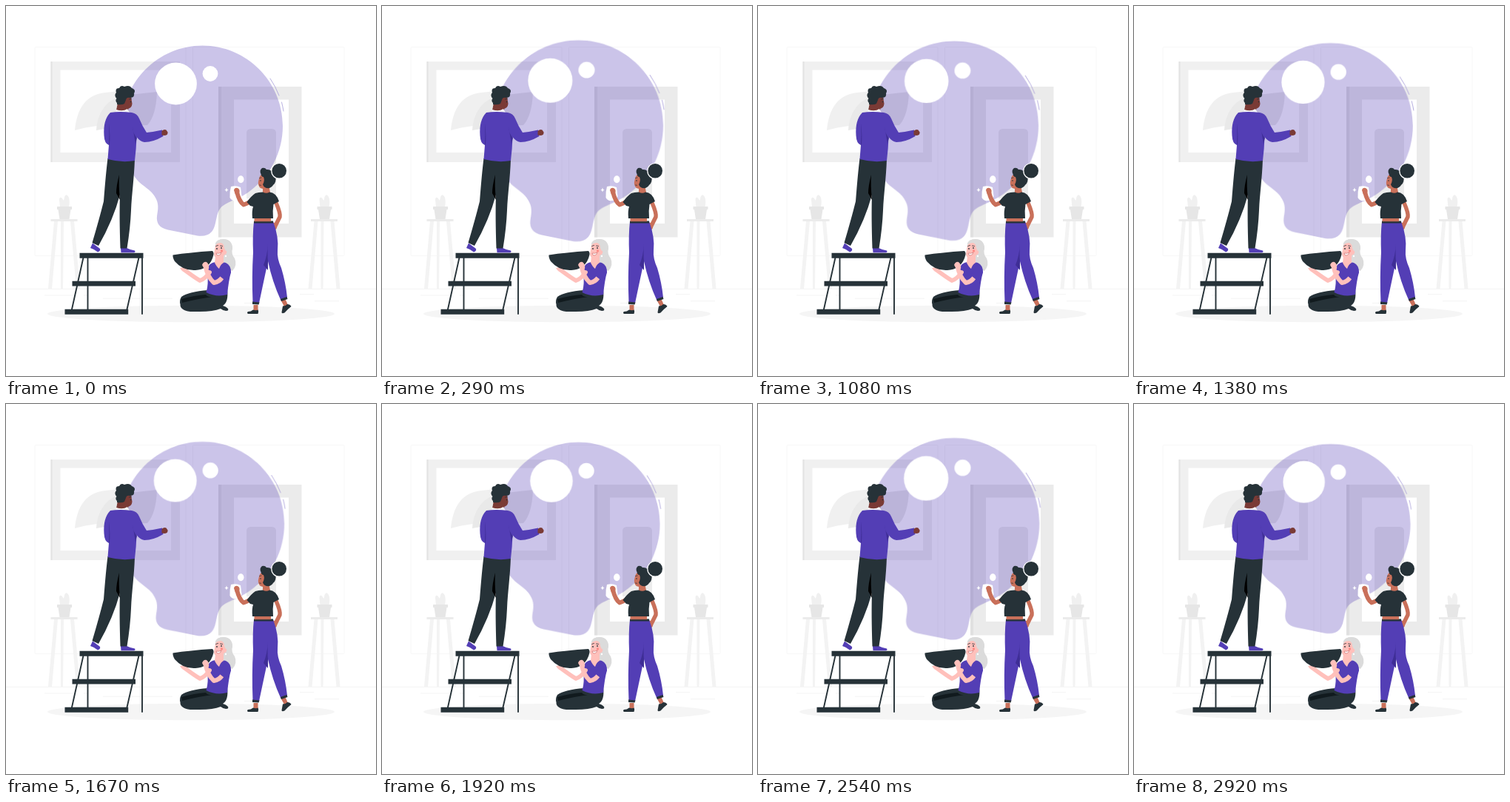
An HTML page for the animation above (2.96 s loop, 500 by 500 pixels).

```html
<!DOCTYPE html>
<html lang="en">
<head>
<meta charset="utf-8">
<title>Bright idea</title>
<style>
  html, body { margin: 0; width: 100%; height: 100%; overflow: hidden; background: #fff; }
  svg { display: block; width: 100vw; height: 100vh; }
  .ink { fill: #263238; }
  .violet { fill: #533eb5; }
  .shade { fill: #3f2e96; }
  .line { fill: none; stroke-linecap: round; stroke-linejoin: round; }
  #bulb {
    transform-origin: 268px 180px;
    animation: pulse 2960ms linear infinite;
  }
  @keyframes pulse {
    0% { transform: scale(1); }
    16.2% { transform: scale(1.094); }
    21.28% { transform: scale(1.088); }
    36.49% { transform: scale(1.048); }
    46.62% { transform: scale(1.027); }
    64.86% { transform: scale(1.014); }
    73.31% { transform: scale(1.056); }
    79.4% { transform: scale(1.096); }
    85.81% { transform: scale(1.06); }
    92.23% { transform: scale(1.031); }
    98.65% { transform: scale(.995); }
    100% { transform: scale(1); }
  }
</style>
</head>
<body>
<svg viewBox="0 0 500 500">
  <defs>
    <g id="stand">
      <path fill="#f3f3f3" d="M65 291h5l-8 91h-5zM74 291h4l-1 91h-3zM87 291h5l8 91h-5z"/>
      <path fill="#ebebeb" d="M60.500 288h36v3h-36z"/>
      <path fill="#f0f0f0" d="M73 272l-1-10q0-4 3-3l3 4 1-5q2-5 5-1 3 5 1 15z"/>
      <path fill="#e6e6e6" d="M69 271h20v4h-1.500l-2 13h-13l-2-13H69z"/>
    </g>
  </defs>

  <!-- room -->
  <g fill="none" stroke="#f4f4f4" stroke-width=".7">
    <rect x="39" y="55.500" width="204" height="282" rx="1"/>
    <rect x="252.500" y="55.500" width="204.500" height="282" rx="1"/>
    <path stroke="#efefef" d="M0 382.400H500M417 398.700h33M322 401.500h9M397 389.500h19M52 391h43M105 391h6M131 395.300h94"/>
  </g>
  <path fill="#f0f0f0" d="M60.500 75H235v136H60.500z"/>
  <path fill="#e3e3e3" d="M60.500 75h2v136h-2z"/>
  <path fill="#fff" d="M73.500 86.500H223v111.500H73.500z"/>
  <path fill="#f0f0f0" d="M93 168C96 138 108 120 134 117Q155 114 170 116L160 160Q120 160 93 168z"/>
  <path fill="#e9e9e9" d="M122 168C124 142 137 125 160 121Q183 118 204 116Q203 148 191 161Q150 162 122 168z"/>
  <path fill="#ebebeb" d="M287 109H399.500V312.500H287z"/>
  <path fill="#e0e0e0" d="M287 109h4v203.500h-4z"/>
  <path fill="#fff" d="M308 126.500h74V294h-74z"/>
  <path fill="#ececec" d="M325 172q0-6 6-6h28q6 0 6 6v88h-40z"/>
  <use href="#stand"/>
  <use href="#stand" x="351.500"/>
  <ellipse cx="250" cy="416" rx="194" ry="11.300" fill="#f5f5f5"/>

  <g id="bulb">
    <path fill="#533eb5" fill-opacity=".3" d="M265.500 53.500C325 53.500 374 102 374 162C374 199 356 230 331 249C319 259 301 264 293 270C282 278 286 296 278 305Q272 312 259 310.500L219 302.500C207 300 203 293 204 284C205 277 207 269 203 261C197 247 183 244 174 231C162 212 157 187 157 162C157 102 206 53.500 265.500 53.500z"/>
    <circle cx="229.500" cy="105" r="28.400" fill="#fff"/>
    <circle cx="276" cy="91.500" r="10.400" fill="#fff"/>
    <path class="line" stroke="#a69cd9" stroke-width=".8" d="M357 98A111.500 111.500 0 0 1 369 121M372.500 130A111.500 111.500 0 0 1 375 142"/>
  </g>

  <!-- step ladder -->
  <path class="line" stroke="#263238" stroke-width="1.900" d="M110.500 340V411M184 340V416M104.500 340L88.500 412M179.500 340L163 412"/>
  <path class="ink" d="M99.500 333.700h86v7h-86zM89.500 371.800H175v6.700H89.500zM79.500 409.800H165.200v7H79.500z"/>

  <!-- painter on the ladder -->
  <path class="violet" d="M117 320.500l10 7.500q1 3-3 4.500-5-4-10-5.500zM155 327h8q6 3 11 3.500 1.500 2-1 2.800h-17.500z"/>
  <path class="ink" d="M137.500 206L174 207C173 235 170 253 169 276Q168 300 163.500 327.500H154.500Q153 284 154 255Q145 289 125 324L116.500 320Q126 288 132 264Q135 225 137.500 206z"/>
  <path fill="#000" d="M153 228q-4 15-4 25l5 9q-2-20-1-34z"/>
  <path fill="#7a3a35" d="M151 131l-2 10q8 5 16 0l1-7z"/>
  <path fill="#7a3a35" d="M154 124C158 118 166 118 169 123L170.500 132Q170 139 163 139Q154 138 154 124z"/>
  <path class="ink" d="M150 131Q147 128 149.500 125Q145.500 121 149 117Q147 111 153 111Q155 106 160 109Q167 106 170 111Q176 113 173 118Q174 124 167 124Q163 123 162 127L160 132Q157 134 150 133z"/>
  <circle cx="168.500" cy="129.500" r=".8" class="ink"/>
  <path class="line" stroke="#263238" stroke-width=".8" d="M166.500 126l3-.8"/>
  <path fill="#f4f4f7" d="M149 140q9 3 15-1l3 5h-19z"/>
  <path class="violet" d="M141 144Q154 142 170 144Q177 145 180 152Q184 162 190 171Q200 170 211 167.500L212.500 176Q199 184 187 184Q181 183 176.500 177Q176 193 174 209Q156 212 137.500 207L139 188Q133 186 132.500 175Q131 154 141 144z"/>
  <path class="shade" d="M139 159q2 15 1 28l-1 1q1-14 0-29zM171 163q1 11 6 15l-2 8q-2-12-4-23z"/>
  <path fill="#7a3a35" d="M210.500 169q3-3 6-1.500l2 3q.5 4-4 4.500l-4-.5z"/>

  <!-- seated helper -->
  <path fill="#dbdbdb" d="M283 322Q284 315 294 315Q305 315 306 327Q304 335 309 341Q313 350 306 358Q297 356 294 345z"/>
  <path class="ink" d="M273 384H299Q301 400 293 405Q302 408 300 411.500Q295 413 290 409Q280 413 262 413H249Q235 411 235.500 403Q234 398 237 393Q247 386 273 384z"/>
  <path fill="#111a1e" d="M237 396q18-5 33-6 3 4 10 3-18 2-42 8z"/>
  <path class="violet" d="M279 347Q286 344 297 347Q304 350 304 360Q301 370 299 390Q284 394 270.500 387Q274 376 272 362Q271 350 279 347z"/>
  <path class="line" stroke="#ffc0bb" stroke-width="5.800" d="M241 356.500Q255 367 262 371Q269 369 275 360"/>
  <path fill="#ffc0bb" d="M235 354q6-2 11 1l-1 5q-7 0-10-6z"/>
  <path fill="#ffc0bb" d="M283 338l-1 9q3 6 6 8 2-6 6-8v-9z"/>
  <path fill="#ffc0bb" d="M283 324Q285 319 291 319Q297 321 297 330Q295 342 287 341.500Q281 340 281 335z"/>
  <path fill="#dbdbdb" d="M282.500 323Q284 315 294 315Q306 316 306 328Q303 338 299 339Q297 331 295 327Q295 321 290 320Q286 320 282.500 323z"/>
  <path fill="#ffc0bb" d="M295 331q4-2 3 3-2 4-5 1z"/>
  <circle cx="285" cy="328" r=".9" class="ink"/>
  <circle cx="291" cy="327" r=".9" class="ink"/>
  <circle cx="291.500" cy="331" r="1.700" fill="#ff8b86"/>
  <path class="line" stroke="#263238" stroke-width=".8" d="M283.500 324.500l3-1M289.500 324l3 .5"/>
  <path fill="#fff" stroke="#c75b5b" stroke-width=".6" d="M284 334q4 1 7-1-1 4-4 4-3 0-3-3z"/>
  <circle cx="297" cy="338" r="1.200" fill="#fff"/>
  <path class="ink" d="M225.500 336.500Q248 333 279 331Q282 333 279 341Q273 356 256 357Q239 358 228 345Q225 340 225.500 336.500z"/>
  <path class="line" stroke="#ffc0bb" stroke-width="6" d="M269.500 351Q272 366 281 374Q288 373 292 367"/>
  <path fill="#ffc0bb" d="M265 350q2-5 6-4 4 3 3 9l-5 2z"/>
  <path class="violet" d="M296 350Q304 352 304 360L297 371.500L287.500 364z"/>

  <!-- cleaner -->
  <path fill="#fff" d="M304 244Q311 242 317 245L318.500 257Q317 264 311 263Q305 264 302.500 259Q302 251 304 244z"/>
  <ellipse cx="317.300" cy="234.200" rx="4.200" ry="5" fill="#fff"/>
  <path fill="#fff" d="M298 245.500q.3 2.700 2.700 3-2.400.3-2.700 3-.3-2.700-2.700-3 2.400-.3 2.700-3z"/>
  <path class="line" stroke="#c9705a" stroke-width="5.500" d="M365 266Q371 280 370 285L363 299"/>
  <path fill="#c9705a" d="M360 292l5 2 1 6q-3 5-6 2z"/>
  <path class="line" stroke="#c9705a" stroke-width="5.800" d="M312 251Q315 264 321 268.500Q329 266 335 260"/>
  <path fill="#c9705a" d="M308 249q1-4 5-3 4 2 2 7l-5 2z"/>
  <path fill="#c9705a" d="M334.500 404h6v8h-6zM371 397l6-2 4 9-5 2z"/>
  <path class="ink" d="M334 410.500q4 1.500 6.500 0 1.500 3 0 5.500H327q-2-1.500 0-3 4 0 7-2.500zM374 405.500q4 0 6-2.500 4 0 5.500 3-4 3-9 8.500-4 1.500-4-.5z"/>
  <path class="violet" d="M335 291H361Q369 313 367 330Q366 341 372 354Q378 374 380 394L371.500 398Q360 373 354 345Q348 373 342 401.500L333.500 400.500Q332 366 334 333Q333 310 335 291z"/>
  <path class="shade" d="M354 322q-1 16-6 28l6 7v-12q-1-10 0-23z"/>
  <path class="ink" d="M333 399.500l9.500 1-1 3-8.500-.5zM371 396l8.500-3 1 3-8.500 3zM335 290.500h26v3h-26z"/>
  <path fill="#c9705a" d="M335.500 285h22.500v6.200h-22.500z"/>
  <path fill="#c9705a" d="M347 241v11q5 5 10 0l-2-11z"/>
  <path class="ink" d="M337 253Q341 251.500 347 251.500Q352 254 356 251.500Q365 252 369 264L361.500 268Q360 277 361 287H333Q332 277 334 271L330 270L325.500 265Q331 257 337 253z"/>
  <path fill="#c9705a" d="M343 230Q341 236 340.800 239Q341 246 347 247Q355 245 358 236L354 226H347z"/>
  <path class="ink" d="M344.500 227Q342 222 346 219Q350 218 352 221Q359 220 364 230Q366 238 361 242Q358 247 352 246Q348 245 347 241Q350 236 348 231Q345 231 344.500 227z"/>
  <circle cx="369" cy="223" r="10.800" fill="#fff"/>
  <circle cx="369.200" cy="222.800" r="9.800" class="ink"/>
  <circle cx="344" cy="236" r=".8" class="ink"/>
  <path class="line" stroke="#263238" stroke-width=".7" d="M342.500 232.500l2.500-.5M342.500 242l2 .3"/>
</svg>
</body>
</html>
```
